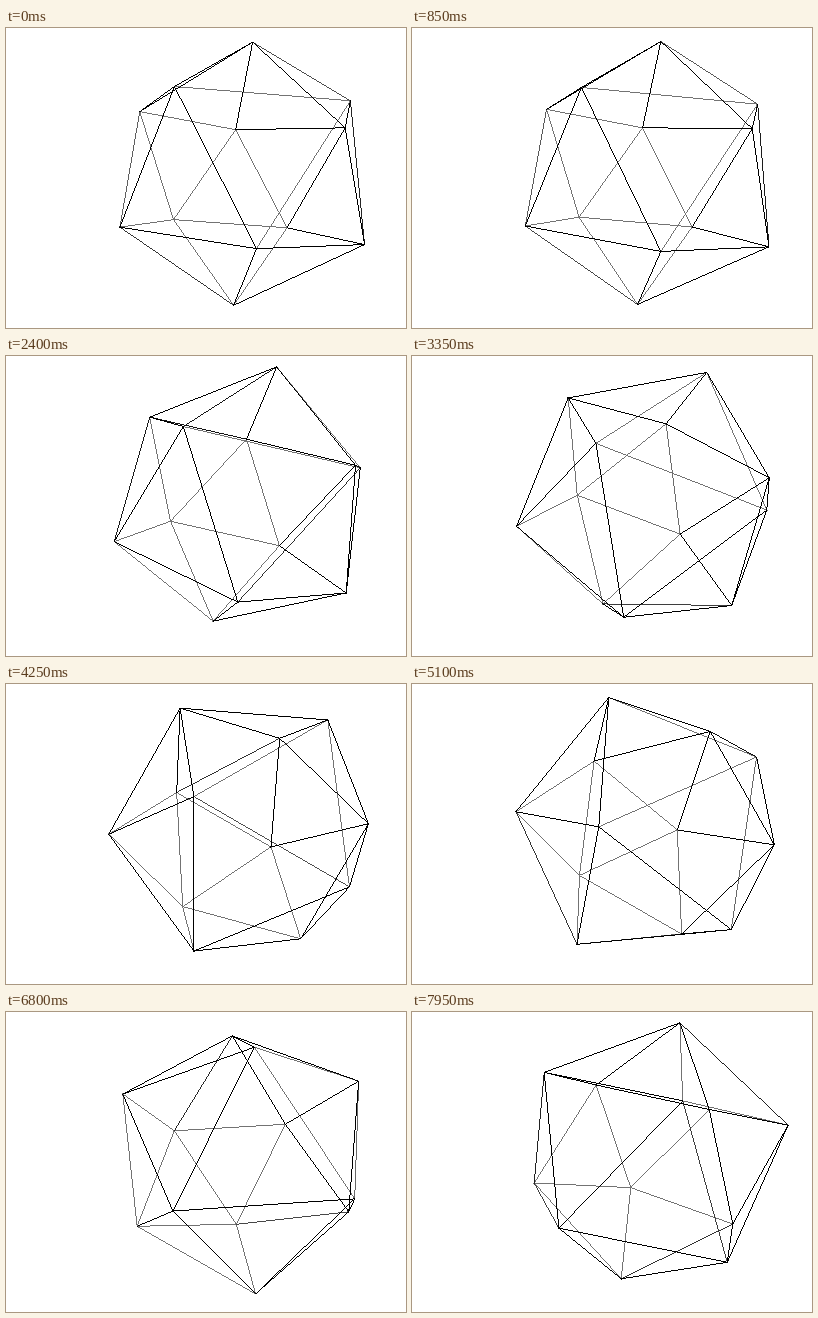
Write an HTML page with a canvas that moves like this. It is 400 px wide and 300 px high and loops after 8 s.

```html
<!DOCTYPE html>
<html lang="en">
<head>
<meta charset="utf-8">
<title>Turning icosahedron</title>
<style>
  html, body { margin: 0; width: 100%; height: 100%; overflow: hidden; background: #fff; }
  canvas { display: block; }
</style>
</head>
<body>
<canvas id="stage" width="400" height="300"></canvas>
<script>
const ctx = document.getElementById('stage').getContext('2d');
const LOOP = 8000, STEP = 50;

// Perspective: where the solid's centre lands, its size there, depth strength,
// and the skew that comes from sitting beside the optical axis.
const CENTER = [237.2, 144.8], SCALE = 132, DEPTH = 0.304, SKEW = [0.0868, -0.012];

// Fixed spin axis (y down, z towards the viewer) and two directions across it.
const AXIS = [-0.7885, -0.0726, 0.611];
const SIDE_A = [0.0917, -0.9958, 0];
const SIDE_B = [0.6084, 0.056, 0.7918];

// Edges facing either of these directions turn grey.
const FRONT_LIGHT = [0.4, -0.4, 0.82];
const BACK_LIGHT = [-0.5, 0.35, -0.79];

const dot = (a, b) => a[0] * b[0] + a[1] * b[1] + a[2] * b[2];
const combine = (a, u, b, v, c, w) => u.map((_, i) => a * u[i] + b * v[i] + c * w[i]);
const ramp = (x, from, to) => Math.min(1, Math.max(0, (x - from) / (to - from)));

// Unit icosahedron: corners of three golden rectangles.
const LONG = 0.85065, SHORT = 0.52573;
const corners = [];
for (const a of [LONG, -LONG]) {
  for (const b of [SHORT, -SHORT]) corners.push([a, b, 0], [0, a, b], [b, 0, a]);
}
const edges = [];
corners.forEach((p, i) => corners.forEach((q, j) => {
  if (i < j && dot(p, q) > 0.4) edges.push([i, j]);
}));

// The spin swings slowly back and forth about the axis.
const spinAt = ms => 2.1734 - 1.65 * Math.cos(0.25 * (ms / 1000 - 0.15));

function project(p) {
  const k = SCALE / (1 - DEPTH * p[2]);
  return [0, 1].map(i => CENTER[i] + k * (p[i] + SKEW[i] * p[2]));
}

// One-pixel line without smoothing, sampled at pixel centres of its longer direction.
function pixelLine(p, q) {
  const main = Math.abs(q[0] - p[0]) >= Math.abs(q[1] - p[1]) ? 0 : 1;
  const side = 1 - main;
  if (p[main] > q[main]) [p, q] = [q, p];
  const slope = (q[side] - p[side]) / (q[main] - p[main]);
  for (let m = Math.floor(p[main]); m <= q[main]; m++) {
    const s = Math.floor(p[side] + slope * (m + 0.5 - p[main]));
    ctx.fillRect(main ? s : m, main ? m : s, 1, 1);
  }
}

function draw(ms) {
  const spin = spinAt(ms), c = Math.cos(spin), s = Math.sin(spin);
  const u = combine(c, SIDE_A, s, SIDE_B, 0, AXIS);
  const v = combine(-s, SIDE_A, c, SIDE_B, 0, AXIS);
  const points = corners.map(([a, b, d]) => combine(a, u, b, v, d, AXIS));
  const flat = points.map(project);

  const lines = edges.map(([i, j]) => {
    const out = points[i].map((x, k) => x + points[j][k]);
    const lit = Math.max(ramp(dot(out, FRONT_LIGHT), 1.25, 1.45), ramp(dot(out, BACK_LIGHT), 0.6, 0.8));
    return { i, j, grey: Math.round(115 * lit) };
  }).sort((a, b) => b.grey - a.grey);

  ctx.fillStyle = '#fff';
  ctx.fillRect(0, 0, 400, 300);
  for (const { i, j, grey } of lines) {
    ctx.fillStyle = `rgb(${grey},${grey},${grey})`;
    pixelLine(flat[i], flat[j]);
  }
}

const start = performance.now();
function tick() {
  const ms = (performance.now() - start) % LOOP;
  draw(Math.floor(ms / STEP) * STEP);
  requestAnimationFrame(tick);
}
tick();
</script>
</body>
</html>
```
